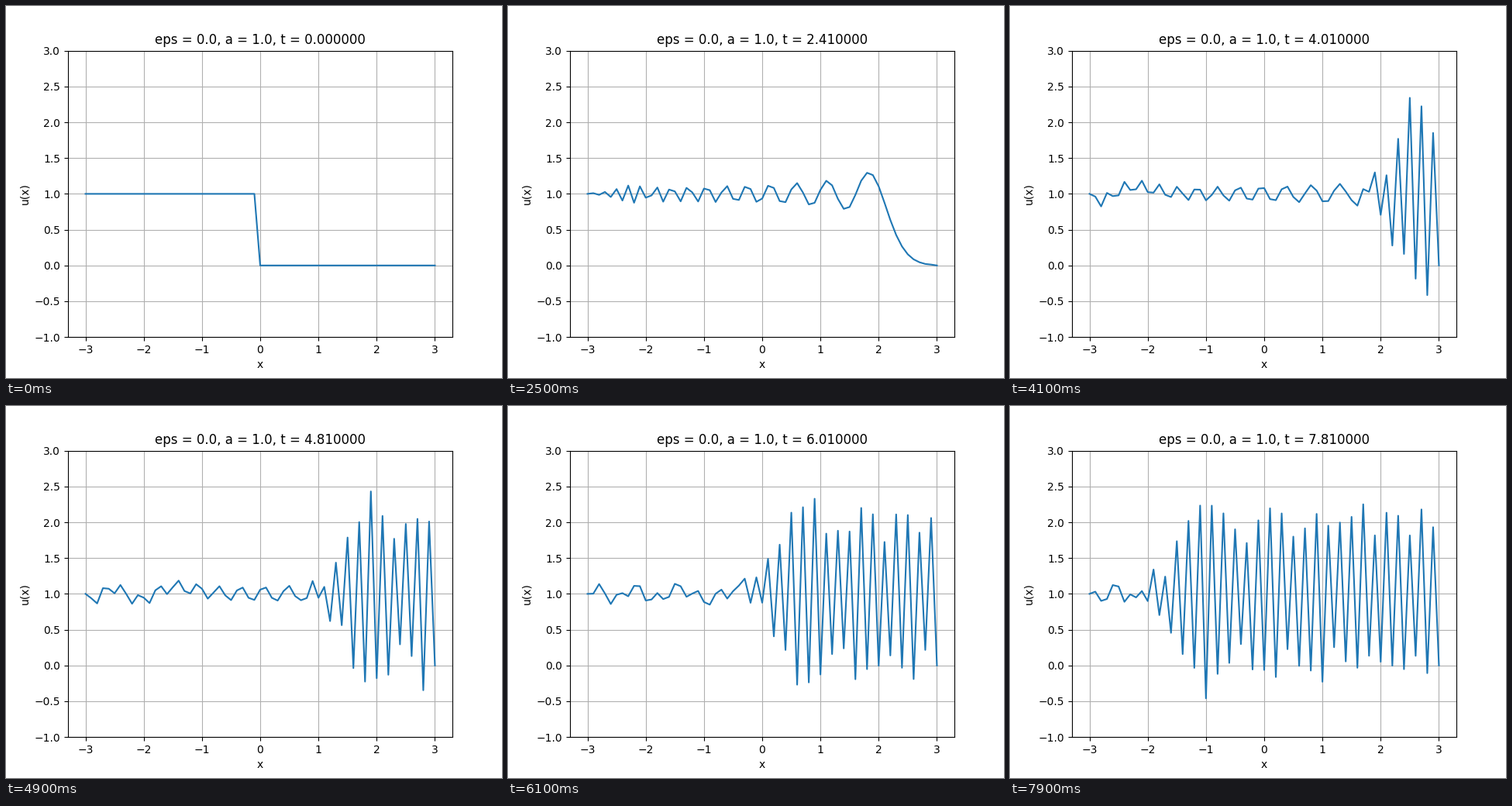
These frames come from a looping animation (640x480 px, 8000 ms). A matplotlib script:

```python
import numpy as np
import matplotlib.pyplot as plt
from matplotlib.animation import FuncAnimation

EPS, A = 0.0, 1.0
H, DT = 0.1, 0.001
FRAMES, INTERVAL = 80, 100
STRIDE, FIRST = 100, 10  # solver steps per frame, and before the first one

x = np.linspace(-3, 3, 61)


def step(u):
    """Forward Euler in time, central differences in space, fixed ends."""
    new = u.copy()
    slope = (u[2:] - u[:-2]) / (2 * H)
    curve = (u[2:] - 2 * u[1:-1] + u[:-2]) / H**2
    new[1:-1] += DT * (EPS * curve - A * slope)
    return new


def solve():
    u = np.where(x < -H / 2, 1.0, 0.0)
    states, times, n = [u], [0.0], 0
    for k in range(1, FRAMES):
        goal = FIRST + (k - 1) * STRIDE
        while n < goal:
            u = step(u)
            n += 1
        states.append(u)
        times.append(n * DT)
    return states, times


states, times = solve()

fig, ax = plt.subplots(figsize=(6.4, 4.8), dpi=100)
line, = ax.plot(x, states[0])
ax.set_xlim(-3.3, 3.3)
ax.set_ylim(-1, 3)
ax.set_xlabel("x")
ax.set_ylabel("u(x)")
ax.grid(True)
title = ax.set_title("")


def draw(k):
    line.set_ydata(states[k])
    title.set_text(f"eps = {EPS}, a = {A}, t = {times[k]:.6f}")
    return line, title


anim = FuncAnimation(fig, draw, frames=FRAMES, interval=INTERVAL,
                     repeat=True, repeat_delay=0, blit=False)
plt.show()
```
